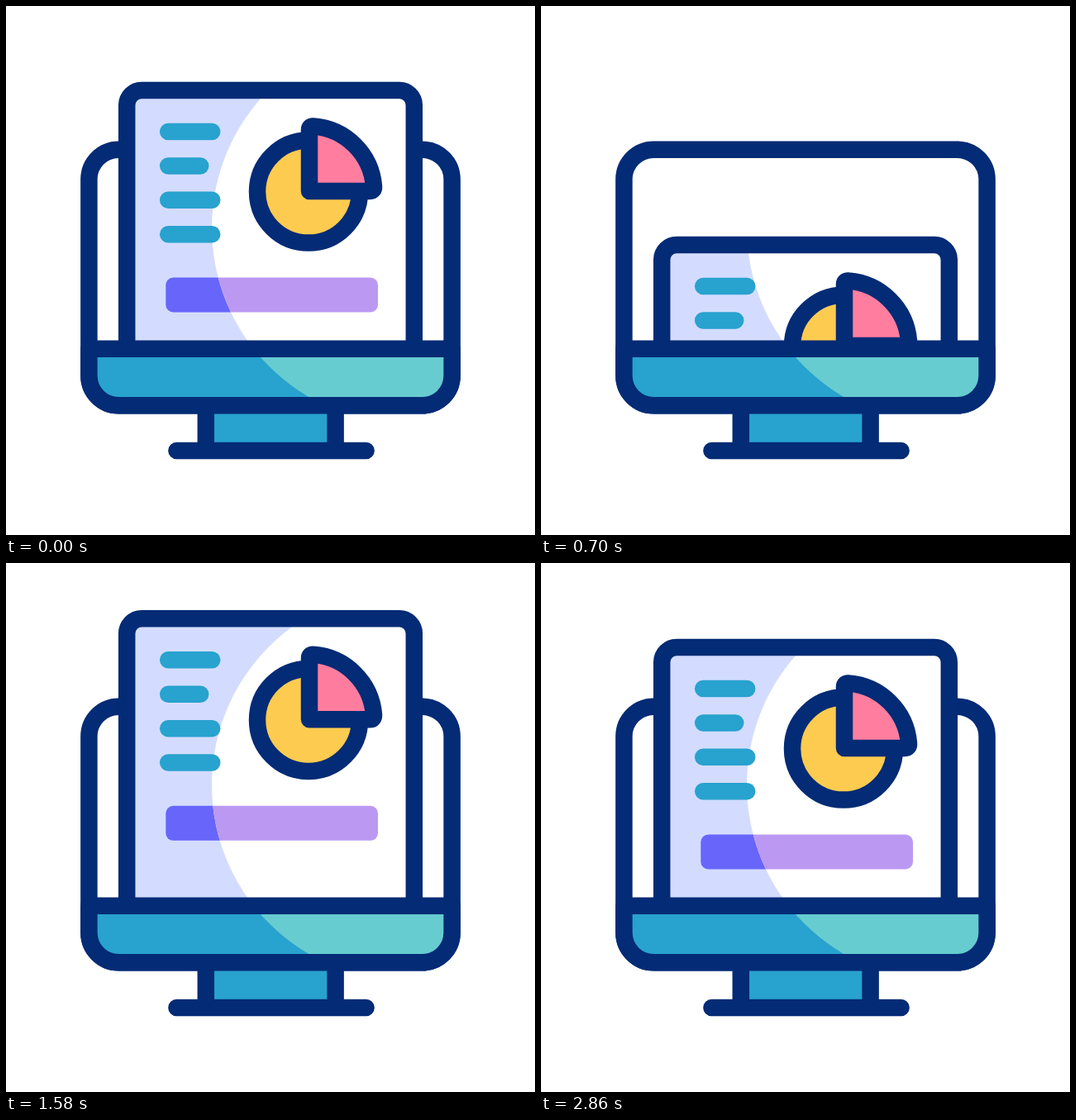
Recreate the animation shown at these times as an HTML page. Size 640 by 640 pixels, loop 3.24 s.

```html
<!DOCTYPE html>
<html lang="en">
<head>
<meta charset="utf-8">
<title>Presentation icon</title>
<style>
  html, body { margin: 0; height: 100%; overflow: hidden; background: #fff; }
  svg { display: block; width: 100vw; height: 100vh; }
  .line { fill: none; stroke: #042b75; stroke-width: 20.5; stroke-linecap: round; stroke-linejoin: round; }
  .bars { stroke: #28a2ce; stroke-width: 20.5; stroke-linecap: round; }
  .rays { stroke: #fdcb50; stroke-width: 20; stroke-linecap: round; }
</style>
</head>
<body>
<svg viewBox="0 0 640 640">
  <defs>
    <clipPath id="screen"><rect width="640" height="415"/></clipPath>
    <clipPath id="glow"><circle cx="486" cy="268.5" r="237"/></clipPath>
    <rect id="panel" x="146.2" y="102" width="347.6" height="460" rx="18"/>
    <rect id="strip" x="193.3" y="328.5" width="256.7" height="42" rx="9"/>
    <path id="chin" d="M100.4 414.7H539.6V447.3a36 36 0 0 1-36 36H136.4a36 36 0 0 1-36-36Z"/>
  </defs>

  <rect class="line" x="100.4" y="173.8" width="439.2" height="309.5" rx="36"/>

  <g clip-path="url(#screen)">
    <g class="slide">
      <use href="#panel" fill="#d3dcfe"/>
      <use href="#strip" fill="#6865fa"/>
    </g>
    <g clip-path="url(#glow)">
      <g class="slide">
        <use href="#panel" fill="#fff"/>
        <use href="#strip" fill="#bb99f2"/>
      </g>
    </g>
    <g class="slide">
      <use href="#panel" class="line"/>
      <g class="bars"></g>
      <circle class="line" cx="366" cy="224.6" r="62" style="fill:#fdcb50"/>
      <path id="slice" class="line" d="M367 224V150Q367 145 372 145.5A79.4 79.4 0 0 1 445 218Q445.5 224 440 224Z"/>
    </g>
  </g>

  <path fill="#28a2ce" d="M242 484H398V538H242Z"/>
  <path class="line" d="M241.8 484V538M398.6 484V538M206.4 538H435.6"/>
  <use href="#chin" fill="#28a2ce"/>
  <use href="#chin" fill="#66ccd0" clip-path="url(#glow)"/>
  <use href="#chin" class="line"/>
  <g class="rays"></g>
</svg>
<script>
const LOOP = 3240;
const $ = s => document.querySelector(s);
const clamp = x => Math.min(1, Math.max(0, x));
const ramp = (t, a, b) => clamp((t - a) / (b - a));
const easeOut = x => 1 - (1 - x) ** 2;

function addLine(parent, x1, y1, x2, y2) {
  const el = document.createElementNS('http://www.w3.org/2000/svg', 'line');
  Object.entries({ x1, y1, x2, y2 }).forEach(([k, v]) => el.setAttribute(k, v));
  return parent.appendChild(el);
}

// Panel offset keys: time, distance below rest
const keys = [[0, 0], [240, 0], [390, -39], [540, 35], [900, 315], [1000, 315], [1040, 275.5],
  [1300, 97], [1380, 48], [1550, -37], [1780, 10], [1960, 0], [LOOP, 0]];

function slope(i) {
  if (i === 0 || i === keys.length - 1) return 0;
  const [[t0, v0], [, v1], [t2, v2]] = keys.slice(i - 1, i + 2);
  return (v1 - v0) * (v2 - v1) <= 0 ? 0 : (v2 - v0) / (t2 - t0);
}

function panelOffset(t) {
  const i = keys.findIndex(k => k[0] > t) - 1;
  const [t0, v0] = keys[i], [t1, v1] = keys[i + 1];
  const d = t1 - t0, x = (t - t0) / d, y = 1 - x;
  return v0 * y * y * (1 + 2 * x) + v1 * x * x * (3 - 2 * x)
    + d * x * y * (slope(i) * y - slope(i + 1) * x);
}

// Bars: rest end, stretch
const bars = [[249.2, 13.4], [235.2, 23.5], [249.2, 16.7], [249.2, 29.5]].map(([end, grow], i) => {
  const y = 152 + 41.4 * i;
  return { end, grow, start: 1680 + 60 * i, el: addLine($('.bars'), 196.2, y, end, y) };
});

const rays = [[508, 95.5, 505.5, 63.5], [545.5, 118, 568, 83], [581.5, 144.5, 609.5, 135.5]]
  .map(p => ({ p, el: addLine($('.rays'), ...p) }));

const slides = document.querySelectorAll('.slide');
const pink = [255, 125, 158], blue = [40, 162, 206];

function draw(t) {
  const dy = panelOffset(t);
  slides.forEach(g => g.setAttribute('transform', `translate(0 ${dy})`));

  const mix = ramp(t, 1580, 1740) - ramp(t, 2320, 2380);
  $('#slice').style.fill = `rgb(${pink.map((c, i) => c + (blue[i] - c) * mix)})`;

  for (const b of bars) {
    const wave = Math.sin(Math.PI * ramp(t, b.start, b.start + 1000)) ** 2;
    b.el.setAttribute('x2', b.end + b.grow * wave);
  }

  const head = easeOut(ramp(t, 1600, 1880)), tail = ramp(t, 1880, 2120) ** 2;
  $('.rays').style.display = head > tail ? '' : 'none';
  for (const { p: [x1, y1, x2, y2], el } of rays) {
    const at = (a, b, k) => a + (b - a) * k;
    el.setAttribute('x1', at(x1, x2, tail));
    el.setAttribute('y1', at(y1, y2, tail));
    el.setAttribute('x2', at(x1, x2, head));
    el.setAttribute('y2', at(y1, y2, head));
  }
}

const origin = performance.now();
function tick() {
  draw((performance.now() - origin) % LOOP);
  requestAnimationFrame(tick);
}
tick();
</script>
</body>
</html>
```
